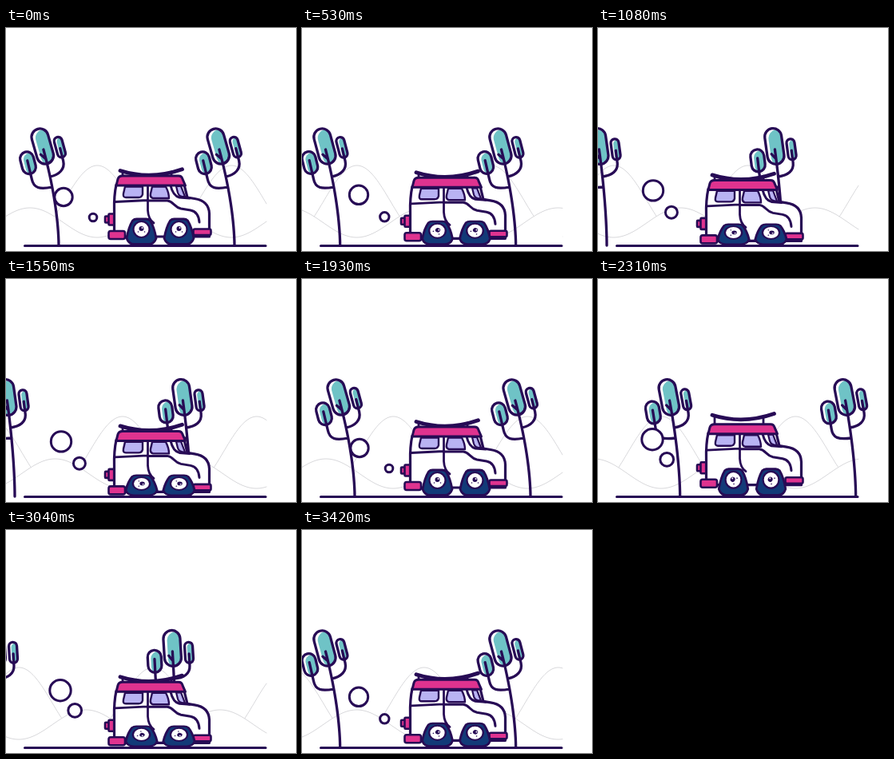
These frames come from a looping animation (363x279 px, 3500 ms). An HTML page with a canvas:

```html
<!DOCTYPE html>
<html lang="en">
<head>
<meta charset="utf-8">
<title>Desert drive</title>
<style>
html, body { margin: 0; width: 100%; height: 100%; overflow: hidden; background: #fff; }
canvas { display: block; width: 363px; height: 279px; }
</style>
</head>
<body>
<canvas id="stage"></canvas>
<script>
const W = 363, H = 279, LOOP = 3500;
const INK = '#270b55', TEAL = '#6fc3c6', PINK = '#df338f', GLASS = '#b9b3f3', NAVY = '#123a78', HILL = '#d9d9dc';
const GROUND = 272, TAU = Math.PI * 2;

const cv = document.getElementById('stage');
const g = cv.getContext('2d');
const dpr = window.devicePixelRatio || 1;
cv.width = Math.round(W * dpr);
cv.height = Math.round(H * dpr);

// Moments at which the picture changes: runs of seven even steps
const runs = [[70, 530], [600, 1080], [1150, 1620], [1700, 2160], [2310, 2800], [2880, 3340]];
const marks = [0];
for (const [a, b] of runs)
  for (let i = 0; i < 7; i++) marks.push(Math.ceil((a + (b - a) * i / 6) / 10) * 10);
marks.push(3420);

function shape(d, fill, width = 3.2) {
  const p = new Path2D(d);
  if (fill) { g.fillStyle = fill; g.fill(p); }
  g.lineWidth = width;
  g.strokeStyle = INK;
  g.stroke(p);
}

function box(x, y, w, h, r, fill, width = 2.6) {
  g.beginPath();
  g.roundRect(x, y, w, h, r);
  g.fillStyle = fill;
  g.fill();
  g.lineWidth = width;
  g.strokeStyle = INK;
  g.stroke();
}

function ring(x, y, r, fill, width) {
  g.beginPath();
  g.arc(x, y, r, 0, TAU);
  g.fillStyle = fill;
  g.fill();
  if (width) {
    g.lineWidth = width;
    g.strokeStyle = INK;
    g.stroke();
  }
}

// A white range of hills that hides what lies behind it
function hills(peak, mid, amp) {
  const line = new Path2D();
  for (let x = 0; x <= 326; x += 2)
    line.lineTo(x, mid - amp * Math.cos((x - peak) / 168 * TAU));
  const land = new Path2D(line);
  land.lineTo(326, GROUND);
  land.lineTo(0, GROUND);
  g.fillStyle = '#fff';
  g.fill(land);
  g.lineWidth = 1;
  g.strokeStyle = HILL;
  g.stroke(line);
}

function cactus(base, lean) {
  // Bends a point given by side offset and height
  const bend = (x, h) => {
    const k = h / 125;
    const a = lean * 1.7 / 125 * Math.pow(k, 0.7);
    return [base + lean * Math.pow(k, 1.7) + x * Math.cos(a), GROUND - h + x * Math.sin(a), a];
  };
  const at = (x, h) => bend(x, h).slice(0, 2);

  function pad(x, h, w, len, shine) {
    const [px, py, a] = bend(x, h);
    g.save();
    g.translate(px, py);
    g.rotate(a);
    g.beginPath();
    g.roundRect(-w / 2, -len / 2, w, len, w / 2);
    g.fillStyle = '#fff';
    g.fill();
    g.save();
    g.clip();
    g.beginPath();
    g.roundRect(-w / 2 + shine, -len / 2 + shine / 2, w, len, w / 2);
    g.fillStyle = TEAL;
    g.fill();
    g.restore();
    g.lineWidth = 3.3;
    g.strokeStyle = INK;
    g.beginPath();
    g.roundRect(-w / 2, -len / 2, w, len, w / 2);
    g.stroke();
    g.restore();
  }

  pad(0, 124, 21, 45, 4.5);
  pad(-23, 109, 17, 28, 4);
  pad(20.5, 117.5, 10, 26, 3);

  g.lineWidth = 3.3;
  g.strokeStyle = INK;
  g.beginPath();
  for (let h = 0; h <= 120; h += 6) g.lineTo(...at(0, h));
  g.moveTo(...at(-5, 115));
  g.lineTo(...at(0, 108));
  g.moveTo(...at(-23, 112));
  g.lineTo(...at(-23, 88));
  g.bezierCurveTo(...at(-23, 76), ...at(-16, 73), ...at(0, 73));
  g.moveTo(...at(20.5, 116));
  g.lineTo(...at(20.5, 101));
  g.bezierCurveTo(...at(20.5, 91), ...at(12, 86), ...at(0, 86));
  g.stroke();
}

function wheel(x, squash, turn) {
  g.save();
  g.translate(x, 271);
  g.scale(1 + (1 - squash) * 0.3, squash);
  g.translate(0, -19);
  shape('M-18.5 11Q-16-3-11-11Q-9-13-6-13H6Q9-13 11-11Q16-3 18.5 11Q16 18.5 9 18.5H-9Q-16 18.5-18.5 11Z', NAVY, 2.8);
  ring(0, 0, 10, '#fff', 2.2);
  g.rotate(turn);
  ring(0, -1, 3, INK);
  ring(1, -2, 1, '#fff');
  ring(-4, 3, 0.8, INK);
  ring(4, 3, 0.8, INK);
  g.restore();
}

function car(p, ang) {
  const dy = 4.5 * Math.sin(ang - 0.225) + 1;
  const hop = -7 * Math.max(0, Math.sin(Math.PI * (p - 4) / 8));
  g.save();
  g.translate(0, dy);

  // Roof rack
  shape(`M146 ${181 + hop}V187M207 ${180 + hop}V187`, null, 2.8);
  shape(`M143 ${178.5 + hop}Q181 ${190.5 + hop} 220.5 ${176.8 + hop}`, null, 4.8);

  // Rear box
  box(124, 235.5, 6, 8, 1, PINK);
  box(128.5, 232.5, 8, 14, 1, PINK);

  // Body
  shape('M138 196Q135 210 135.5 228V261H254.5V232C254 220 246 215 236 213.5L227 212L223 196Z', '#fff');
  shape('M177.5 197V228Q178 239 185 244M137 217.5L177 215.5', null, 2.8);
  shape('M178 216H202C210 217 210 224 219 226L231 228Q241 230 242 243', null, 3);
  shape('M206 197Q209 210 217 212L230 213', null, 3);
  shape('M149 198.5H171V208Q170 212 166 212H150Q146 212 147 207Z', GLASS, 2.4);
  shape('M183 198.5H200Q204 206 204 213H184Q180 212 181 207Z', GLASS, 2.4);
  shape('M213 198H219L224 211Q217 212 215 206Z', GLASS, 2.2);
  shape('M138 197L140 189Q141 185 146 185H216Q220 185 221 189L224.5 197Z', PINK, 3);

  // Bumpers
  box(128.5, 254, 20.5, 10, 2.5, PINK);
  box(234.5, 251.5, 22, 7.5, 2, PINK);
  g.restore();

  const squash = 1 - Math.max(-1, dy) * 0.039;
  wheel(169.5, squash, ang);
  wheel(216.5, squash, ang);
}

function smoke(q) {
  ring(72 - q, 211.5 - 2.7 * q, 11.2 + 0.5 * q, '#fff', 3);
  ring(109 - 5.7 * q, 237 - 0.7 * q * q, 4.8 + 0.9 * q, '#fff', 3);
}

function draw(t) {
  const slot = Math.round(t / 77);
  const step = Math.floor(slot * 1.94 + 0.4);
  const p = step % 12;
  const ang = p / 12 * TAU;

  g.setTransform(dpr, 0, 0, dpr, 0, 0);
  g.lineCap = g.lineJoin = 'round';
  g.fillStyle = '#fff';
  g.fillRect(0, 0, W, H);

  hills(114.3 - 3.5 * step, 217, 45);
  hills(30 - 3.5 * step, 243.5, 18.5);

  const lean = -20.5 + 11.2 * (1 - Math.cos(ang)) - Math.sin(ang);
  for (let i = 0; i < 3; i++) cactus(66 + 220 * i - p * 220 / 12, lean);

  shape(`M23.5 ${GROUND + 0.5}H325`, null, 3);
  smoke(step % 6);
  car(p, ang);
}

let start = null;
function tick(now) {
  if (start === null) start = now;
  const t = (now - start) % LOOP;
  let shown = 0;
  for (const m of marks) if (m <= t) shown = m;
  draw(shown);
  requestAnimationFrame(tick);
}
draw(0);
requestAnimationFrame(tick);
</script>
</body>
</html>
```
